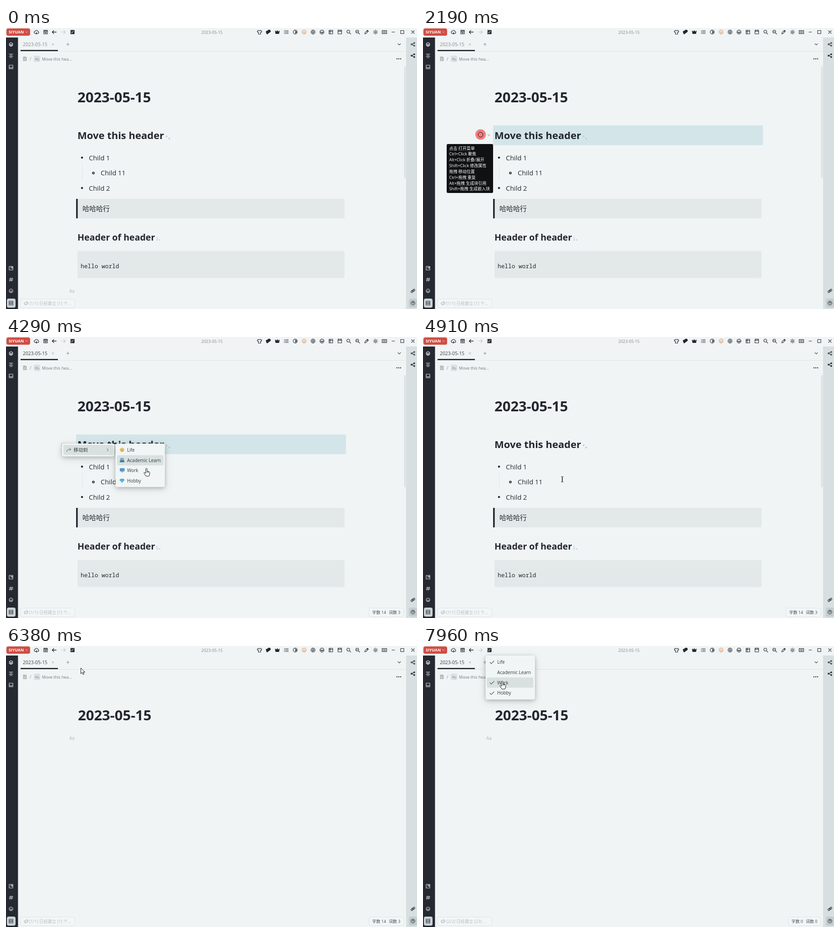
Recreate the animation shown at these times as an HTML page. Size 903x620 px, loop 8 s.

```html
<!DOCTYPE html>
<html lang="zh">
<head>
<meta charset="utf-8">
<style>
  html, body { margin: 0; width: 100%; height: 100%; overflow: hidden; background: #f0f4f5; }
  svg { display: block; width: 903px; height: 620px; }
  text { font-family: "Open Sans", "Noto Sans CJK SC", "Noto Sans CJK", sans-serif; white-space: pre; }
  .mono { font-family: "Noto Sans Mono", monospace; }
  .pop { filter: drop-shadow(0 2px 4px #0003) drop-shadow(0 4px 8px #0002); }
</style>
</head>
<body>
<svg id="stage" viewBox="0 0 903 620"></svg>
<script>
const INK = '#24272e', PALE = '#b4bbbd', LINE = '#dde4e5', PANEL = '#e3e9e9', PAPER = '#f0f4f5';

const text = (x, mid, size, str, fill = INK, weight = 400, cls = '') =>
  `<text x="${x}" y="${Math.round(mid + size * .36)}" font-size="${size}" fill="${fill}" font-weight="${weight}" class="${cls}">${str}</text>`;
const rect = (x, y, w, h, fill, r = 0, more = '') =>
  `<rect x="${x}" y="${y}" width="${w}" height="${h}" rx="${r}" fill="${fill}" ${more}/>`;
const dot = (x, y, r, fill) => `<circle cx="${x}" cy="${y}" r="${r}" fill="${fill}"/>`;
const icon = (x, y, d, stroke = INK, fill = 'none', w = 1.1) =>
  `<path transform="translate(${x} ${y})" d="${d}" stroke="${stroke}" fill="${fill}" stroke-width="${w}" stroke-linejoin="round" stroke-linecap="round"/>`;
const ring = (r, x = 0, y = 0) => `M${x - r} ${y}a${r} ${r} 0 1 0 ${2 * r} 0a${r} ${r} 0 1 0 ${-2 * r} 0`;
const during = (from, to, body, fade = 0) =>
  `<g data-from="${from}" data-to="${to}" data-fade="${fade}">${body}</g>`;
const dots = (x, y, fill = INK) => [-4, 0, 4].map(d => dot(x + d, y, 1.2, fill)).join('');

const BOX = 'M-4-4h8v8h-8z', CHECK = 'M-4 0l3 3 6-6', CHEVRON = 'M-3-1.5l3 3 3-3', RIGHT = 'M-1.5-3l3 3-3 3';
const LENS = 'M1.8 1.8L4.5 4.5' + ring(3.2, -1, -1);
const SHARE = 'M-2-.6L2-2.6M-2 .6L2 2.6' + ring(1.3, -3, 0) + ring(1.3, 3, -3) + ring(1.3, 3, 3);

const topBar = () => {
  const tools = [
    'M-2-4L-5-2l1 2.5 1.5-.5v4.5h5V0L4 .5 5-2 2-4Q0-2-2-4z',
    '', '',
    'M-4.5-3h1M-4.5 0h1M-4.5 3h1M-2-3h6.5M-2 0h6.5M-2 3h6.5',
    ring(4.4) + 'M0-2q3 0 3 2t-3 2q2-2 0-4',
    '',
    ring(4.4) + ring(2) + 'M0 0h.1',
    ring(4.4) + 'M-4 0h8M-2 1q2 2 4 0',
    BOX + 'M-1.5-4v8M-4-1.5h8',
    BOX + 'M-4-1.5h8M-2-5v2M2-5v2',
    LENS,
    LENS + 'M-2.5-1h3',
    'M-4 4l.7-2.8L2-4l2 2-5.2 5.3zM1-3l2 2',
    ring(2) + 'M0-4.8v1M0 3.8v1M-4.8 0h1M3.8 0h1M-3.4-3.4l.6.6M2.8 2.8l.6.6M-3.4 3.4l.6-.6M2.8-2.8l.6-.6',
    'M-5-3.5h10v7h-10zM-3-1.2h6M-3 1.2h6',
    'M-3 0h6',
    'M-3.5-3.5h7v7h-7z',
    'M-3-3l6 6M3-3l-6 6'
  ];
  return rect(1, 1, 52, 16, '#d14d43', 4) + text(6, 9.2, 8.8, 'SIYUAN', '#fff', 700) +
    icon(45, 9, 'M-2-1l2 2 2-2', '#f7c9c5', 'none', 1) +
    icon(67, 9, 'M-2 3q-3 0-3-2.6T-2.5-2Q-1.5-4.5 1-3.8T3-1.4Q5-1 5 1T2.5 3M0 0v4.5M-1.5 3L0 4.5 1.5 3') +
    icon(87, 9, BOX + 'M-4-1.5h8M-2 .5h4M-2 2h4M-4-3.2h8') +
    icon(106, 9, 'M4.5 0h-9M-1-3.5L-4.5 0-1 3.5', INK, 'none', 1.3) +
    icon(126, 9, 'M-4.5 0h9M1-3.5L4.5 0 1 3.5', '#c3c9cb') +
    icon(146, 9, BOX, INK, INK) + icon(146, 9, 'M-1.5 2L2-2M-4-2h1M-4 1h1', '#fff') +
    text(429, 9.3, 9, '2023-05-15', '#83888b') +
    tools.map((d, i) => i < 17 ? icon(557 + i * 19.6, 9, d) : icon(894, 9, d)).join('') +
    icon(576.5, 9, 'M-3 4.5L-5 0Q-5-2.8-1.5-2.5-1-5 2-4.8 5-4 4.5-1z', INK, INK) +
    icon(596, 9, 'M-4.5-2.5L-2 0 0-3.5 2 0 4.5-2.5 3.5 3.5h-7z', INK, INK) +
    icon(655, 9, ring(4.4) + 'M-2-1l1 1M2-1l-1 1M-2 1.5q2 1.5 4 0', '#e29a62');
};

const docks = () =>
  rect(0, 21, 26.4, 599, '#262931') + rect(879, 21, 24, 599, '#d7dfe1') +
  icon(11, 36, 'M0-4L4-1.5 0 1-4-1.5zM-4 .5L0 3 4 .5M-4 2.3L0 4.8 4 2.3', '#d8dcde') +
  icon(11, 61, 'M-4-3.5h8M-2.5-1h5M-4 1.5h8M-2.5 4h5', '#d8dcde') +
  icon(11, 86, BOX + 'M-4 1h2.5l1 1.5h1l1-1.5H4', '#d8dcde') +
  icon(11, 530, BOX + 'M0-4v4l1.5-1L3 0v-4', '#d8dcde') +
  icon(11, 555, 'M-1-4l-1.5 8M2.5-4L1 4M-3.5-1.5h8M-4 1.5h8', '#d8dcde') +
  icon(11, 580, ring(4) + 'M-1.5-1h.1M1.5-1h.1M-2 1q2 2 4 0', '#d8dcde') +
  rect(2, 597, 19, 20, '#c9d3d5', 4) + icon(11, 607, BOX + 'M-1-1.5L-2.5 0-1 1.5M1-1.5L2.5 0 1 1.5') +
  icon(894, 36, SHARE) + icon(894, 61, SHARE, INK, INK) +
  icon(894, 580, 'M-.5 1.5Q-2 0-.5-1.5L1.5-3.5Q3-4.5 4-3T3.5-.5L2 1M.5-1.5Q2 0 .5 1.5L-1.5 3.5Q-3 4.5-4 3T-3.5.5L-2-1') +
  rect(885, 597, 18, 20, '#c4cdcf', 4) + icon(894, 607, ring(4.2) + 'M-1.3-1Q-1-2.3.2-2.2T1.3-.8L0 .5M0 2.3h.1');

const tabs = () =>
  rect(26, 51, 853, 1, LINE) + rect(32, 48.5, 82, 2.5, '#17191d') +
  during(0, 2390, text(37, 36.3, 10.35, '2023-05-15', '#858b8e')) +
  during(2390, 8000, text(37, 36.3, 10.35, '2023-05-15', '#3c4046')) +
  icon(103, 36, 'M-2-2l4 4M2-2l-4 4', '#a2a8aa', 'none', .9) +
  icon(136, 36, 'M-3 0h6M0-3v6', '#7d8386', 'none', .9) +
  icon(864, 36, CHEVRON, '#4d5257') +
  icon(41.5, 68, 'M-3.5-4.5h5l2 2v7h-7z', '#b5bcbe', '#b5bcbe') + icon(41.5, 68, 'M-1.5 0h3M-1.5 2h3', PAPER, 'none', .7) +
  text(52, 68, 10, '/', '#8d9396') + rect(61, 61, 14, 14, '#dae1e2', 3) + text(64, 68, 8, 'H₂', '#6c7276') +
  text(79, 68.3, 9, 'Move this hea...', '#72787b') + dots(863, 68);

const editor = () =>
  during(0, 5680, text(157, 153, 31, '2023-05-15', INK, 700)) +
  during(5680, 8000, text(158, 153, 31, '2023-05-15', INK, 700)) +
  during(1320, 4910, rect(154, 215, 593, 43.5, '#d3e5e9', 2)) +
  during(0, 5050, text(157, 237, 22, 'Move this header', INK, 700) +
    dot(353, 239, 1.7, '#b3cccd') + dot(358.5, 244, 1.7, '#abcad6') +
    dot(167, 286, 2.3, INK) + text(182, 286.5, 14.5, 'Child 1') +
    rect(167, 301, 1, 33, LINE) + dot(192, 320, 2.8, INK) + dot(192, 320, 1, PAPER) +
    text(208, 320, 14.5, 'Child 11') +
    dot(167, 353, 2.3, INK) + text(182, 353.5, 14.5, 'Child 2')) +
  '<g id="rest">' +
  during(0, 5750, rect(154, 377, 590, 43, PANEL, 3) + rect(154, 377, 3.6, 43, INK) + text(168, 399, 15, '哈哈哈行')) +
  during(0, 5960, text(157, 462, 19.6, 'Header of header', INK, 700) +
    dot(332, 463, 1.6, '#b5dce3') + dot(332, 467.5, 1.6, '#a9d8e4') + dot(337.5, 467.5, 1.6, '#a9d8e4') +
    rect(157, 492, 587, 60, PANEL, 4) + text(164, 525, 12.8, 'hello world', INK, 400, 'mono')) +
  during(5190, 5750, text(165, 505, 12, 'cpp', '#adb5b6') + text(140, 508, 9.5, '66', PALE, 600) +
    rect(705, 496, 34, 19, '#dae1e1', 4) + dots(730, 505.5, '#8b9294') +
    icon(713, 505, 'M-2-2h6.5v6.5h-6.5zM-2 2h-2.5v-6.5h6.5v2.5', '#8b9294', 'none', 1), 130) +
  '</g>' +
  during(0, 470, text(139, 580, 10, 'Aa', PALE)) + during(5960, 8000, text(139, 203, 10, 'Aa', PALE)) +
  during(1030, 4910, text(121, 237, 10, 'H₂', '#bcc4c6') + icon(144.5, 237, 'M-3-2h6l-3 4z', '#c0c8ca', '#c0c8ca', .5)) +
  rect(874.5, 84, 4, 248, LINE, 2, 'id="thumb"');

const notice = str => text(51, 607.5, 9.2, str, PALE);
const counts = (x, a, b, gap) => rect(x, 598, 874 - x, 19, '#f3f6f7', 4, `stroke="${LINE}"`) +
  text(x + 7, 607.5, 9, `字数 ${a}`, '#43484d') + text(x + gap, 607.5, 9, `词数 ${b}`, '#43484d');
const footer = () =>
  rect(32, 598, 119, 19, '#f3f6f7', 4, `stroke="${LINE}"`) +
  icon(44, 607.5, 'M-4-1.5h2L2-4v7L-2 1.5h-2zM-2.5 1.5l1 2.5M4-2.5Q5-.5 4 1.5', PALE, 'none', 1.2) +
  during(0, 6640, notice('[1/1] 已经建立 [1] 个...')) +
  during(6640, 7750, notice('[1/2] 已经建立 [1] 个...')) +
  during(7750, 8000, notice('[2/2] 已经建立 [23] ...')) +
  during(2330, 7750, counts(797.5, 14, 3, 43.5)) + during(7750, 8000, counts(802.5, 0, 0, 38.5));

const NOTEBOOKS = ['Life', 'Academic Learn', 'Work', 'Hobby'];
const names = (x, y) => NOTEBOOKS.map((n, i) => text(x, y + i * 22.65, 10, n, '#34383d')).join('');
const panel = (x, y, w, h) => rect(x, y, w, h, '#f1f5f5', 4, 'class="pop"');

const menus = () =>
  during(1530, 3120, rect(52, 256, 102, 108, '#101112', 3) +
    ['点击 打开菜单', 'Ctrl+Click 聚焦', 'Alt+Click 折叠/展开', 'Shift+Click 修改属性', '拖拽 移动位置',
     'Ctrl+拖拽 重复', 'Alt+拖拽 生成块引用', 'Shift+拖拽 生成嵌入块']
      .map((s, i) => text(57.5, 265.3 + i * 12.85, 9, s, '#fff', 500)).join(''), 200) +
  during(3330, 4910, panel(123, 235, 115, 28.5) +
    during(3530, 4910, rect(126, 238, 109, 22.5, '#d9e1e0', 3)) +
    icon(138, 249, 'M-4.5 4Q-4.5-1 0-1h4M1.5-4L4.5-1 1.5 2', '#5b6165', 'none', 1) +
    text(148.5, 249.3, 10.4, '移动到', '#34383d') + icon(223.5, 249, RIGHT, '#5b6165', 'none', 1), 70) +
  during(3600, 4910, panel(240.5, 235, 108.5, 96) +
    [[4130, 4360, 1], [4360, 4500, 2], [4500, 4910, 3]]
      .map(([a, b, i]) => during(a, b, rect(244, 238 + i * 22.65, 102, 22.5, '#d9e1e0', 3))).join('') +
    dot(255, 249, 5, '#f0c878') + icon(255, 249, 'M-2.5-1h1M1.5-1h1M-1.5 2h3', '#7a5230', 'none', .9) +
    rect(251, 267, 8, 5, '#6d8fa0', 2) + rect(250, 272, 10, 4.5, '#3e7fa8', 1) + rect(252, 269, 6, 1, '#dfe9ec') +
    rect(250, 289.5, 10.5, 7, '#4f97cf', 1) + rect(253, 297, 4.5, 1.5, '#8fa3ae') +
    icon(255, 317, 'M-5-1.5L-3-4h6L5-1.5 0 4.5z', '#4aa3d0', '#63b7dd', .6) + icon(255, 317, 'M-5-1.5h10', '#2f86b8', 'none', .8) +
    names(266, 249.3), 70) +
  during(7050, 8000, panel(137.5, 21, 108.5, 97) +
    during(7470, 7750, rect(140.5, 24, 102, 22.5, '#d9e1e0', 3)) +
    during(7820, 8000, rect(140.5, 69.5, 102, 22.5, '#d9e1e0', 3)) +
    during(7680, 8000, icon(151, 36, CHECK, '#53595d')) +
    icon(151, 81, CHECK, '#53595d') + icon(151, 104, CHECK, '#53595d') + names(163, 35.8), 70) +
  during(6710, 7330, rect(109, 21, 48, 19, '#101112', 3) + text(114.5, 30.5, 9.2, '今日笔记', '#fff', 500));

const shape = (name, d, fill = '#fff') =>
  `<path data-shape="${name}" d="${d}" fill="${fill}" stroke="#111" stroke-linejoin="round"/>`;
const cursor = () => '<g id="cursor"><circle id="press" r="11.5" fill="#f27d80"/>' +
  shape('arrow', 'M0 0v12.5l3-2.7 2 4.5 2-.9-2-4.4h4z') +
  shape('hand', 'M-1.5 1.3a1.5 1.5 0 0 1 3 0v5l4.5 1.1q1.7.5 1.5 2.3l-.7 4.3-1.3 3h-6.5l-4.3-6.3q-.6-1.7 1-1.8l2.8 2zM1.5 6.3v3M4 7v2.5') +
  shape('beam', 'M-2.5-6q2.5 0 2.5 1.5v9q0 1.5-2.5 1.5M2.5-6q-2.5 0-2.5 1.5v9q0 1.5 2.5 1.5', 'none') +
  shape('grab', 'M-5.5 0l1.5-3.5 2-1.3h3.5l2.5 1.3 1 2.5-.2 3.5-2 3h-5L-5 2.5z', 'none') + '</g>';

const stage = document.getElementById('stage');
stage.innerHTML = rect(0, 0, 903, 620, PAPER) + topBar() + docks() + tabs() + editor() + footer() + menus() + cursor();

const LOOP = 8000, TICK = 70;
const MOVES = [[470, 1240], [1320, 1730], [2190, 2390], [2790, 2920], [3120, 3740], [3940, 4640],
  [4840, 5610], [5680, 6430], [6500, 7260], [7330, 7960]];
const PRESSES = [[2190, 2330], [3120, 3260], [4840, 4910], [6980, 7120], [7610, 7750]];
const POINTER = [
  [470, 806, 604, 'arrow'], [610, 640, 500, 'beam'], [890, 250, 330, 'beam'], [1030, 150, 255, 'arrow'],
  [1240, 129, 238, 'grab'], [1530, 126.5, 235, 'grab'], [2790, 126.5, 235, 'grab'], [2920, 123, 235, 'grab'],
  [3260, 123, 235, 'arrow'], [3400, 123, 235, 'arrow'], [3530, 150, 238, 'hand'], [3740, 172, 240, 'hand'],
  [3940, 172, 240, 'hand'], [4290, 308.5, 290, 'hand'], [4640, 306, 314, 'hand'], [4910, 306, 314, 'beam'],
  [5330, 304, 315, 'beam'], [5680, 304, 315, 'beam'], [6170, 200, 110, 'arrow'], [6430, 156, 34, 'arrow'],
  [6640, 142.5, 5, 'hand'], [7330, 142.5, 5, 'hand'], [7600, 168, 36, 'hand'], [7680, 168, 36, 'hand'],
  [7960, 174.5, 78, 'hand'], [8000, 174.5, 78, 'hand']
];

const timed = [...stage.querySelectorAll('[data-from]')];
const shapes = [...stage.querySelectorAll('[data-shape]')];
const [pointer, press, rest, thumb] = ['cursor', 'press', 'rest', 'thumb'].map(id => document.getElementById(id));
const show = (el, on) => el.setAttribute('display', on ? 'inline' : 'none');

function snap(t) {
  const span = MOVES.filter(m => m[0] <= t).pop();
  if (!span) return t;
  const [start, end] = span;
  return t >= end ? end : start + Math.floor((t - start) / TICK) * TICK;
}

function drawPointer(t) {
  show(pointer, t >= 470);
  if (t < 470) return;
  const s = snap(t);
  const i = POINTER.findLastIndex(k => k[0] <= s);
  const a = POINTER[i], b = POINTER[i + 1] || a;
  const p = b[0] > a[0] ? (s - a[0]) / (b[0] - a[0]) : 0;
  pointer.setAttribute('transform', `translate(${a[1] + (b[1] - a[1]) * p} ${a[2] + (b[2] - a[2]) * p})`);
  shapes.forEach(el => show(el, el.dataset.shape === a[3]));
  show(press, PRESSES.some(([from, to]) => t >= from && t < to));
}

function draw(t) {
  for (const el of timed) {
    const { from, to, fade } = el.dataset;
    show(el, t >= from && t < to);
    if (+fade) el.setAttribute('opacity', Math.max(0, Math.min(1, (t - from) / fade)));
  }
  rest.setAttribute('transform', `translate(0 ${t < 5050 ? 0 : t < 5750 ? -187 : -240})`);
  thumb.setAttribute('height', t < 5050 ? 248 : t < 5750 ? 295 : t < 5960 ? 365 : t < 6030 ? 464 : 0);
  drawPointer(t);
}

function frame(now) {
  draw(now % LOOP);
  requestAnimationFrame(frame);
}
draw(0);
requestAnimationFrame(frame);
</script>
</body>
</html>
```
